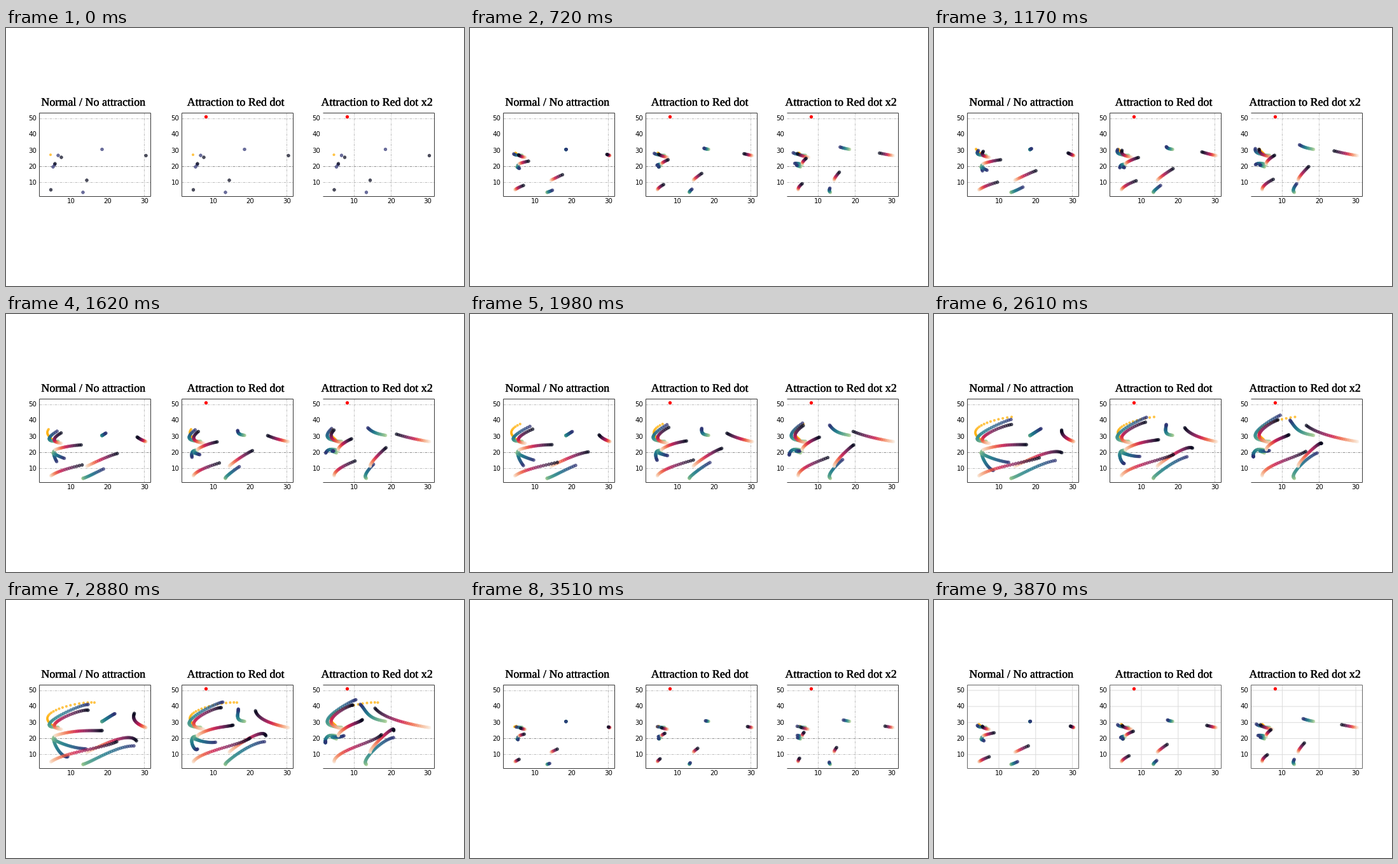
A matplotlib script for the animation above (3900 ms loop, 720 px wide and 405 px high).

```python
from math import comb

import numpy as np
import matplotlib.pyplot as plt
from matplotlib.animation import FuncAnimation
from matplotlib.collections import LineCollection
from matplotlib.colors import LinearSegmentedColormap
from matplotlib.patheffects import withStroke

W, H, DPI = 720, 405, 100
PX = 72 / DPI       # one pixel in points
STEP_MS, TICK_MS, LOOP_MS = 90, 30, 3900
STEPS = 34          # simulation steps before the trails restart
SMOOTH_STEP = 43    # closing step, drawn with a soft full grid
ALPHA = 0.7
TOP, BOTTOM, WIDTH = 133.5, 264.5, 175
SHIFT = (0, 224, 445.5)
LEFTS = (52.5, 276.5, 498.5)
TITLES = ("Normal / No attraction", "Attraction to Red dot",
          "Attraction to Red dot x2")

WARM = LinearSegmentedColormap.from_list("warm", [
    "#faebdd", "#f6b48f", "#f06043", "#cb1b4f", "#841e5a", "#3f1b43", "#03051a"])
COOL = LinearSegmentedColormap.from_list("cool", [
    "#a5cd90", "#6db08e", "#40958d", "#1f7a8c", "#245a85", "#2c3172"])
AMBER = LinearSegmentedColormap.from_list("amber", ["#ffae00", "#ffae00"])

plt.rcParams["font.family"] = "DejaVu Sans"
fig = plt.figure(figsize=(W / DPI, H / DPI), dpi=DPI, facecolor="white")
ax = fig.add_axes([0, 0, 1, 1])
ax.set_xlim(0, W)
ax.set_ylim(H, 0)
ax.axis("off")


def bezier(u, points):
    d = len(points) - 1
    basis = [comb(d, k) * u ** k * (1 - u) ** (d - k) for k in range(d + 1)]
    return np.transpose(basis) @ np.array(points, float)


class Agent:
    """Gathers speed along a curve; attraction adds a steady drift."""

    def __init__(self, cmap, curve, pull=(0, 0), size=5.3):
        u = np.arange(STEPS) / (STEPS - 2)
        self.cmap, self.size = cmap, size
        self.path = bezier(u ** 1.3, curve)
        self.drift = np.outer(u, pull)

    def trail(self, n, strength):
        return self.path[:n + 1] + strength * self.drift[:n + 1]


agents = [
    Agent(AMBER, [(70, 199), (89, 198), (12, 181), (114, 158), (139, 161)], size=4),
    Agent(COOL, [(82, 200), (37, 201), (113, 164.5), (129, 164)], (-12.3, -3.7)),
    Agent(COOL, [(76.5, 214.5), (70, 219), (86.5, 248.5), (97, 246)], (-20, -12)),
    Agent(COOL, [(74, 218), (78, 222), (104, 233), (125, 233.5)], (-19.7, -10.2)),
    Agent(COOL, [(151, 190.5), (149, 192.5), (164, 182), (171, 178.5)], (-29.8, -7.3)),
    Agent(COOL, [(121, 258), (134.5, 254.5), (173, 229), (201, 229)], (-18.7, -6.5)),
    Agent(WARM, [(87, 203), (50.5, 198.5), (114, 171), (129, 173)], (-14.7, -4)),
    Agent(WARM, [(77, 213), (107.5, 203), (137, 205.5), (151, 205)], (-18.2, -8.5)),
    Agent(WARM, [(127, 239), (165.5, 220), (196, 209), (205, 221)], (-20.5, -8)),
    Agent(WARM, [(70.5, 254), (91.5, 239), (155, 232), (174, 222.5)], (-14.7, -5.5)),
    Agent(WARM, [(220, 200.3), (211, 197), (196.5, 190.5), (201.7, 178)], (-33.5, -4)),
]


def tick_x(value):
    return 102 + 5.78 * (value - 10)


def tick_y(value):
    return 217.5 - 2.52 * (value - 20)


def pixel(v):
    """Centre of the pixel that holds v, for crisp one-pixel lines."""
    return np.floor(v) + 0.5


def hline(left, y):
    return [(left, y), (left + WIDTH, y)]


def vline(x):
    return [(x, TOP), (x, BOTTOM)]


def lines(segments, color, style="-"):
    art = LineCollection(segments, colors=color, linewidths=PX,
                         linestyles=style, zorder=1)
    art.set_snap(False)
    ax.add_collection(art)
    return art


def label(x, y, value, ha):
    ax.text(x, y, str(value), size=10.2 * PX, ha=ha, va="center_baseline")


grid, faint, strong, sides, first_sides = [], [], [], [], []
for left, shift, title in zip(LEFTS, SHIFT, TITLES):
    ax.text(left + 84.2, 122, title, family="Liberation Serif", size=18.05 * PX,
            ha="center", va="baseline",
            path_effects=[withStroke(linewidth=0.35 * PX, foreground="black")])
    for value in (10, 20, 30):
        x = tick_x(value) + shift
        label(x, 270.8, value, "center")
        grid.append(vline(x))
    for value in (10, 20, 30, 40, 50):
        y = tick_y(value)
        label(left - 4, y - 0.8, value, "right")
        grid.append(hline(left, y))
    faint += [hline(left, pixel(tick_y(v))) for v in (10, 49.9)]
    strong.append(hline(left, 217.5))
    sides += [hline(left, TOP), hline(left, BOTTOM), vline(left + WIDTH)]
    first_sides.append(vline(left))

# Only some grid lines, and two of the left sides, show in the crisp look
faint += [vline(pixel(tick_x(v) + SHIFT[k]))
          for k, v in ((0, 30), (1, 30), (2, 10), (2, 20))]
DASH = (0, (4, 1.5, 1, 1.5))
crisp = [lines(faint, "#c0c0c0", DASH), lines(strong, "#949494", DASH),
         lines(sides + first_sides[:2], "#383838")]
soft = [lines(grid, "#dcdcdc"), lines(sides + first_sides, "#666666")]

ax.scatter([tick_x(8) + 0.9 + s - 0.9 for s in SHIFT[1:]], [139.3] * 2,
           s=(5.3 * PX) ** 2, c="red", linewidths=0, zorder=3)
EDGE = 0.6
dots = ax.scatter([], [], linewidths=EDGE * PX, zorder=2)


def draw(tick):
    step = tick * TICK_MS // STEP_MS
    n = step % STEPS
    shade = np.linspace(0, 1, n + 1) if n else np.ones(1)
    places, colors, sizes = [], [], []
    for strength, shift in enumerate(SHIFT):
        for agent in agents:
            places.append(agent.trail(n, strength) + (shift, 0))
            rgba = agent.cmap(shade)
            rgba[:, 3] = ALPHA
            colors.append(rgba)
            sizes.append(np.full(n + 1, ((agent.size - EDGE) * PX) ** 2))
    dots.set_offsets(np.concatenate(places))
    dots.set_color(np.concatenate(colors))
    dots.set_sizes(np.concatenate(sizes))
    smooth = step == SMOOTH_STEP
    for art in crisp:
        art.set_visible(not smooth)
    for art in soft:
        art.set_visible(smooth)
    return [dots, *crisp, *soft]


anim = FuncAnimation(fig, draw, frames=LOOP_MS // TICK_MS, interval=TICK_MS,
                     init_func=lambda: draw(0), repeat=True, repeat_delay=0,
                     blit=False)
plt.show()
```
